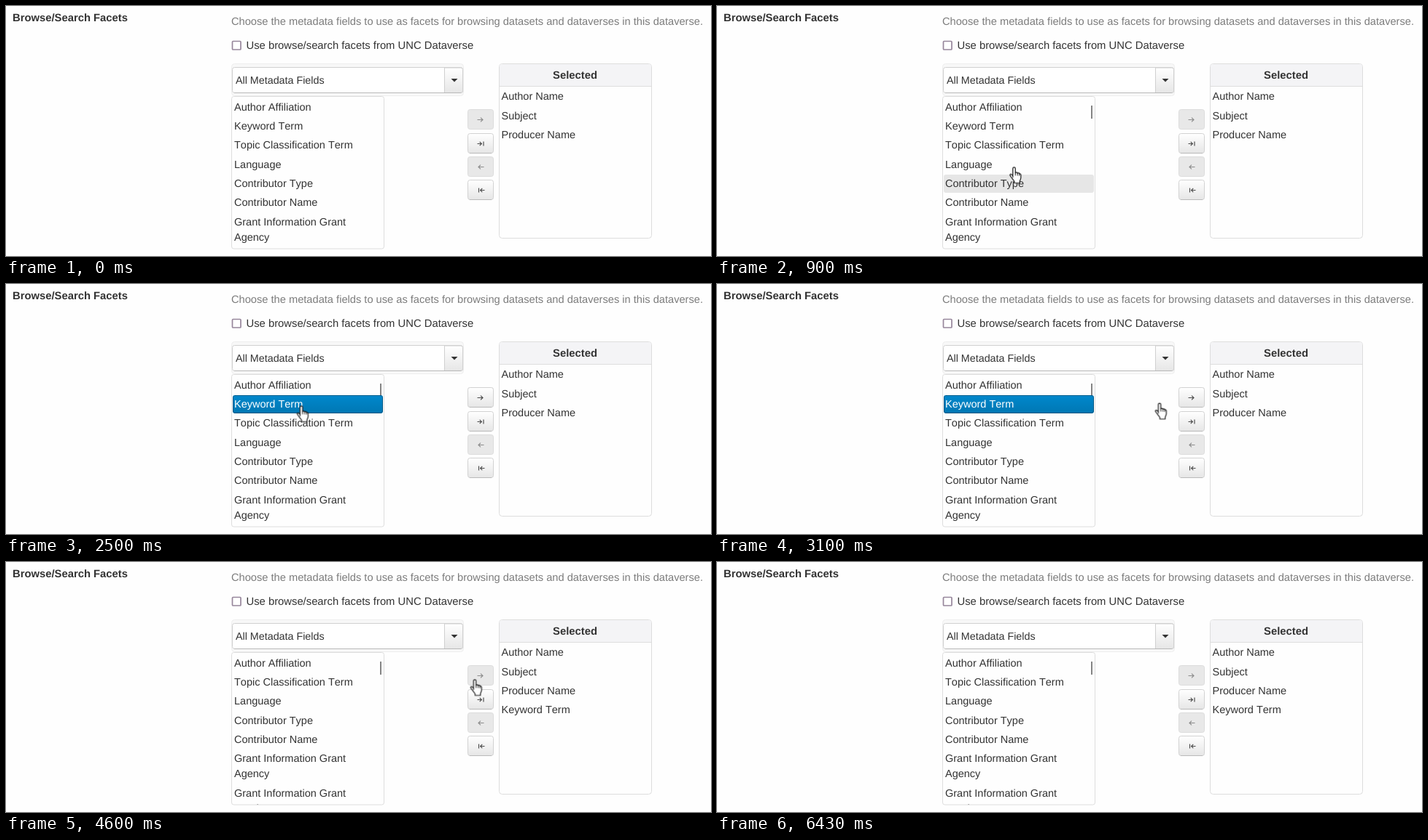
These frames come from a looping animation (967x344 px, 6730 ms). An HTML page:

```html
<!DOCTYPE html>
<html lang="en">
<head>
<meta charset="utf-8">
<title>Browse/Search Facets</title>
<style>
  html, body { margin: 0; width: 100%; height: 100%; overflow: hidden; background: #fefefe; }
  svg { display: block; width: 967px; height: 344px; }
  text {
    font: 14.5px "Liberation Sans", Arial, sans-serif;
    font-kerning: none;
    font-variant-ligatures: none;
    fill: #333;
    text-rendering: geometricPrecision;
  }
  .bold { font-size: 14.8px; font-weight: bold; }
  .hint { font-size: 14.65px; fill: #7c7c7c; }
  .option { font-size: 14.8px; }
  .select { font-size: 14.3px; }
  .box { fill: #fefefe; stroke: #ddd; }
  .hover { fill: #e6e6e6; }
  .button { fill: url(#face); stroke: #d2d2d2; }
  .button.off { fill: #e8e8e8; stroke: #dcdcdc; }
  .icon { fill: none; stroke: #4a4a4a; stroke-width: 1.15; }
  .icon.off { stroke: #8c8c8c; }
  .dots { fill: none; stroke-dasharray: 1 1; }
</style>
</head>
<body>
<svg viewBox="0 0 967 344">
  <defs>
    <linearGradient id="face" x2="0" y2="1">
      <stop stop-color="#fff"/><stop offset="1" stop-color="#e6e6e6"/>
    </linearGradient>
    <linearGradient id="blue" x2="0" y2="1">
      <stop stop-color="#0088cc"/><stop offset="1" stop-color="#0077b3"/>
    </linearGradient>
    <clipPath id="listClip"><rect x="310" y="125" width="208" height="209"/></clipPath>
  </defs>

  <text class="bold" x="9" y="21">Browse/Search Facets</text>
  <text class="hint" x="309" y="26">Choose the metadata fields to use as facets for browsing datasets and dataverses in this dataverse.</text>
  <rect x="310.5" y="48.5" width="11.5" height="11.5" rx="1" fill="#fff" stroke="#97879c" stroke-width="1.7"/>
  <text class="option" x="329.5" y="59">Use browse/search facets from UNC Dataverse</text>

  <rect x="309.5" y="79.5" width="318" height="44" rx="4" fill="#f8f8f8" stroke="#eee"/>
  <rect x="310.5" y="84.5" width="316" height="35" rx="3" fill="#fff" stroke="#d0d0d0"/>
  <path d="M601.5 85H624a2.5 2.5 0 0 1 2.5 2.5V117a2.5 2.5 0 0 1-2.5 2.5H601.5Z" fill="url(#face)" stroke="#d0d0d0"/>
  <path d="M313 119.5h311" stroke="#b8b8b8"/>
  <path d="M610.5 100h9l-4.5 4.5z" fill="#333"/>
  <text class="select" x="315" y="107">All Metadata Fields</text>

  <rect class="box" x="309.5" y="124.5" width="209" height="209.5" rx="3"/>
  <rect id="thumb" x="513" y="137" width="2" height="18" fill="#858585"/>
  <g id="track">
    <rect x="506" y="127" width="11" height="205" rx="4" fill="#f3f3f3"/>
    <path d="M508.5 134l3-4 3 4zM508.5 325l3 4 3-4z" fill="#858585"/>
    <rect x="508.5" y="137" width="6" height="18" rx="3" fill="#858585"/>
  </g>
  <g id="lists" clip-path="url(#listClip)"></g>
  <g id="selected">
    <rect x="311" y="153" width="206" height="25" rx="3" fill="url(#blue)"/>
    <rect id="rowFocus" class="dots" x="311.5" y="153.5" width="205" height="24" rx="3" stroke="#02304a"/>
    <text x="313" y="170" style="fill:#fff">Keyword Term</text>
  </g>

  <rect class="box" x="676.5" y="79.5" width="209" height="240" rx="4"/>
  <path d="M677 110V83a3 3 0 0 1 3-3h202a3 3 0 0 1 3 3V110Z" fill="#f4f4f6"/>
  <path d="M677 110.5h208" stroke="#ddd"/>
  <text class="bold" x="780.5" y="100" text-anchor="middle">Selected</text>
  <text x="679.5" y="129">Author Name</text>
  <text x="679.5" y="156">Subject</text>
  <text x="679.5" y="182">Producer Name</text>
  <text id="added" x="679.5" y="208">Keyword Term</text>

  <g id="buttons"></g>
  <rect id="buttonHover" x="634" y="143" width="34" height="26" rx="3" fill="#999" fill-opacity=".08" stroke="#aaa"/>
  <rect id="buttonDown" x="633.5" y="142.5" width="35" height="27" rx="3" fill="#000" fill-opacity=".1"/>
  <rect id="buttonFocus" class="dots" x="634.5" y="143.5" width="33" height="25" rx="2" stroke="#666"/>

  <g id="cursor">
    <g transform="translate(.5 .5) scale(.96)" stroke="#111" stroke-linejoin="round" stroke-linecap="round">
      <path fill="#fff" stroke-width="1.2" d="M5 14.5V2.2a1.8 1.8 0 0 1 3.6 0V8.2c1-.9 2.8-.6 3 .6 1-.7 2.5-.3 2.7.9 1-.4 2.2.2 2.2 1.6V15.5c0 2-1.6 3.4-1.6 5.2V23H7.2V20.8C6.4 18.6 3 15.8 1.3 12.6 .2 10.6 2.2 9.6 3.4 10.9L5 12.8Z"/>
      <path fill="none" d="M8.6 8.2v3.6M11.6 8.8v3.2M14.3 9.7v2.6"/>
    </g>
  </g>
</svg>

<script>
const LOOP = 6730;
const PRESS = 1930, ENABLE = 1960, MOVE = 4310;
const $ = id => document.getElementById(id);

function add(parent, tag, attrs, content = '') {
  const el = document.createElementNS('http://www.w3.org/2000/svg', tag);
  for (const key in attrs) el.setAttribute(key, attrs[key]);
  el.textContent = content;
  parent.append(el);
  return el;
}

// Each key: [ms, value, easing towards the next key]
function play(el, prop, keys) {
  const frames = keys.map(([ms, value, easing = 'linear']) =>
    ({ offset: ms / LOOP, [prop]: value, easing }));
  frames.push({ offset: 1, [prop]: keys[keys.length - 1][1] });
  el.animate(frames, { duration: LOOP, iterations: Infinity });
}

// Visible only between two times, with hard changes
function show(el, from, to = LOOP) {
  const keys = from > 0 ? [[0, 0, 'step-end'], [from, 1, 'step-end']] : [[0, 1, 'step-end']];
  if (to < LOOP) keys.push([to, 0, 'step-end']);
  play(el, 'opacity', keys);
}

// Metadata list before and after the transfer
const fields = ['Author Affiliation', 'Keyword Term', 'Topic Classification Term', 'Language',
  'Contributor Type', 'Contributor Name', 'Grant Information Grant|Agency', 'Grant Information Grant|Number'];
const hovers = {
  6: [500, 760], 5: [760, 835], 4: [835, 905], 3: [905, 975], 2: [975, 1050], 1: [1100, PRESS]
};

function drawList(names, spans = {}) {
  const group = add($('lists'), 'g');
  let y = 144;
  names.forEach((name, i) => {
    const lines = name.split('|'), extra = (lines.length - 1) * 21;
    if (spans[i]) {
      const mark = add(group, 'rect', {
        class: 'hover', x: 311, y: Math.floor(y) - 17, width: 206, height: 25 + extra, rx: 3
      });
      show(mark, ...spans[i]);
    }
    lines.forEach((line, n) => {
      const label = add(group, 'text', { x: 313, y: Math.floor(y) + 21 * n }, line);
      if (spans[i] && name === 'Keyword Term') show(label, 0, PRESS);
    });
    y += 26.35 + extra;
  });
  return group;
}
show(drawList(fields, hovers), 0, MOVE);
show(drawList(fields.filter(name => name !== 'Keyword Term')), MOVE);

// Transfer buttons
const right = 'M646.5 0h7.5M651 -2.8l3 2.8l-3 2.8', left = 'M655.5 0h-7.5M651 -2.8l-3 2.8l3 2.8';
const rightAll = 'M646.5 0h6M649.7 -2.7l2.7 2.7l-2.7 2.7M655 -3v6', leftAll = 'M656.5 0h-6M653.3 -2.7l-2.7 2.7l2.7 2.7M648.5 -3v6';

function drawButton(y, icon, state = '') {
  const group = add($('buttons'), 'g');
  add(group, 'rect', { class: 'button ' + state, x: 633.5, y: y + .5, width: 35, height: 27, rx: 3 });
  if (!state) add(group, 'path', { d: `M636 ${y + 27.5}h30`, stroke: '#bababa' });
  add(group, 'path', { class: 'icon ' + state, d: icon, transform: `translate(0 ${y + 14.5})` });
  return group;
}
drawButton(142, right, 'off');
show(drawButton(142, right), ENABLE, MOVE);
drawButton(175, rightAll);
drawButton(207, left, 'off');
drawButton(239, leftAll);

show($('thumb'), 500);
show($('track'), 2800, 3100);
show($('rowFocus'), PRESS, 3760);
show($('buttonHover'), 3330, MOVE);
show($('buttonDown'), 3760, 3900);
show($('buttonFocus'), 3760, MOVE);

play($('selected'), 'opacity', [[0, 0, 'step-end'], [PRESS, 1], [4100, 1], [MOVE, 0]]);
play($('added'), 'opacity', [[0, 0], [4360, 0], [4590, 1]]);

const at = (x, y) => `translate(${x}px, ${y}px)`;
play($('cursor'), 'transform', [
  [0, at(409, 345)],
  [390, at(409, 345)],
  [730, at(402, 271)],
  [1060, at(399, 174.5), 'ease-out'],
  [1300, at(398, 167)],
  [2500, at(398, 167), 'cubic-bezier(.4, 0, .7, .9)'],
  [3160, at(611, 163), 'ease-out'],
  [3460, at(636, 161)],
  [5460, at(636, 161), 'cubic-bezier(.42, 0, .7, .43)'],
  [6130, at(594, 262)],
  [6430, at(579, 346)]
]);
</script>
</body>
</html>
```
